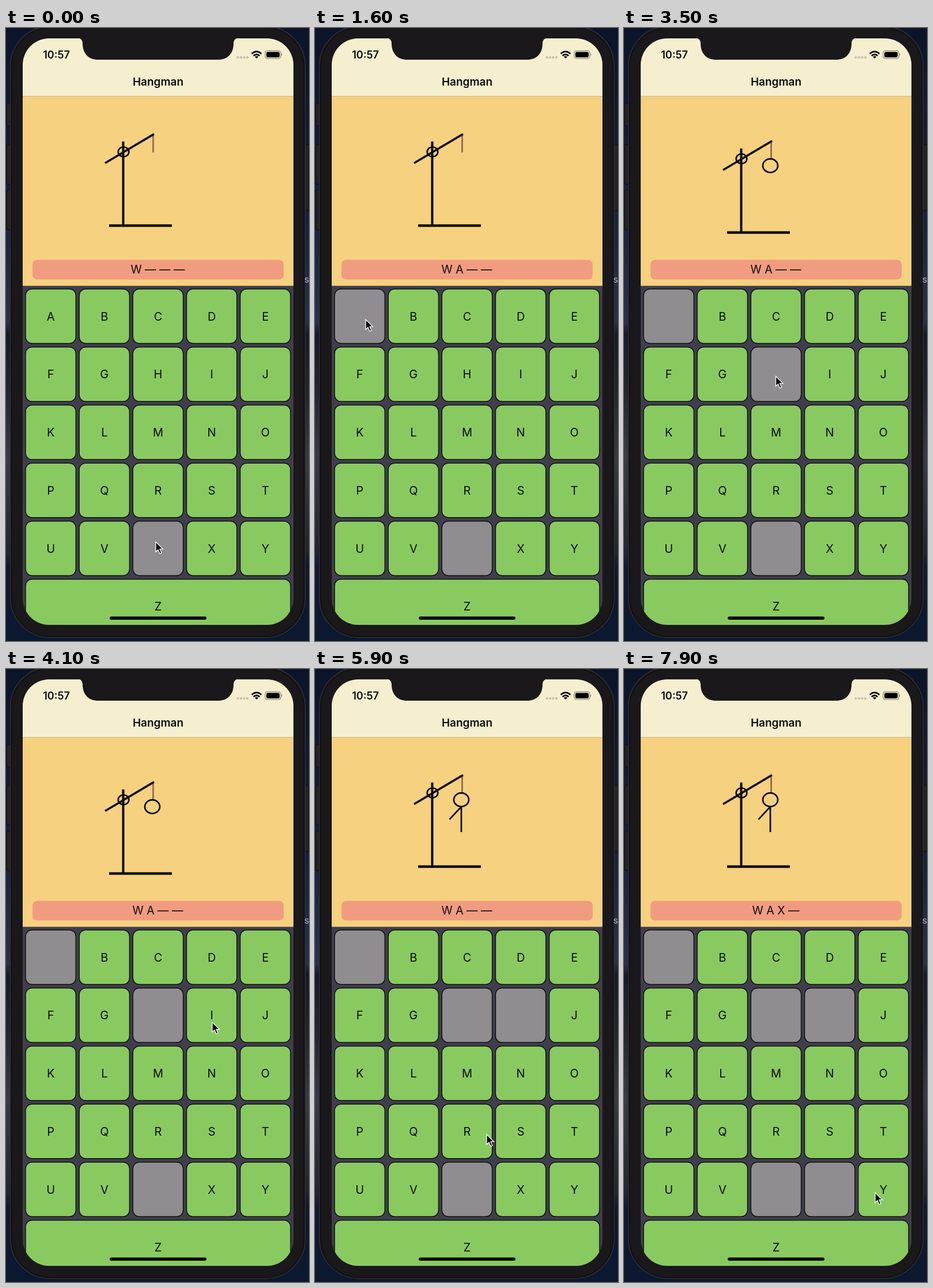
An HTML page for the animation above (8000 ms loop, 526 by 1064 pixels).

```html
<!DOCTYPE html>
<html lang="en">
<head>
<meta charset="utf-8">
<title>Hangman</title>
<style>
  html, body { margin: 0; width: 100%; height: 100%; overflow: hidden; background: #0f1830; }
  svg { display: block; width: 100%; height: 100%; }
  text { font: 20px Inter, "Open Sans", sans-serif; fill: #0b0b0b; text-anchor: middle; }
  .line { fill: none; stroke: #0a0808; stroke-width: 2.7; }
  .key rect { fill: #89ca60; stroke: #0c100c; stroke-width: 1.4; }
  .key.used rect { fill: #908d90; }
  .key.used text { display: none; }
</style>
</head>
<body>
<svg viewBox="0 0 526 1064">
  <defs>
    <linearGradient id="sky" x2="0" y2="1">
      <stop offset="0" stop-color="#0b1429"/>
      <stop offset=".3" stop-color="#14213f"/>
      <stop offset=".48" stop-color="#27324d"/>
      <stop offset=".5" stop-color="#15192a"/>
      <stop offset=".6" stop-color="#252633"/>
      <stop offset=".7" stop-color="#3a3a48"/>
      <stop offset=".85" stop-color="#232533"/>
      <stop offset=".88" stop-color="#0e1932"/>
      <stop offset="1" stop-color="#0c1730"/>
    </linearGradient>
    <clipPath id="screen"><rect x="29" y="18" width="470" height="1018" rx="46"/></clipPath>
  </defs>

  <rect width="526" height="1064" fill="url(#sky)"/>
  <g fill="#242224" stroke="#0c0b0d">
    <rect x="1" y="131" width="9" height="39" rx="2"/>
    <rect x="1" y="202" width="9" height="69" rx="2"/>
    <rect x="1" y="281" width="9" height="69" rx="2"/>
    <rect x="517" y="202" width="9" height="115" rx="2"/>
  </g>
  <rect x="7.5" y="-3" width="512" height="1061" rx="69" fill="#1a181a" stroke="#302e31" stroke-width="1.5"/>
  <rect x="10" y="0" width="507" height="1056" rx="66" fill="none" stroke="#121113" stroke-width="2"/>
  <text x="522" y="442" style="font-size:16px;fill:#aeb0b8">s</text>

  <g clip-path="url(#screen)">
    <rect x="29" y="18" width="470" height="101" fill="#f6efcf"/>
    <rect x="29" y="118" width="470" height="330" fill="#f5d180"/>
    <path d="M29 118.5H499" stroke="#c8b784"/>
    <rect x="29" y="447.5" width="470" height="589" fill="#403e4c"/>
    <g id="keys"></g>
    <path d="M124 17Q133 18 133 27C133 45 144 55 160 55H368C384 55 395 45 395 27Q395 18 404 17Z" fill="#1a181a"/>
  </g>

  <text x="87.5" y="53" style="font-size:18px;font-weight:600">10:57</text>
  <text x="264" y="100" style="font-size:19px;font-weight:600">Hangman</text>
  <g fill="#c9c3aa">
    <circle cx="402.5" cy="51" r="2.2"/><circle cx="408" cy="51" r="2.2"/>
    <circle cx="413.5" cy="51" r="2.2"/><circle cx="419" cy="51" r="2.2"/>
  </g>
  <g fill="none" stroke="#000" stroke-width="2.7">
    <path d="M426.6 44.8Q435 37 443.4 44.8M429.8 48.3Q435 43.4 440.2 48.3"/>
    <path d="M432 50Q435 47.6 438 50L435 53Z" fill="#000" stroke="none"/>
    <rect x="450" y="39.5" width="27" height="13.5" rx="4" stroke="#77735f" stroke-width="1.1"/>
    <rect x="452" y="41.5" width="23" height="9.5" rx="2.3" fill="#000" stroke="none"/>
    <path d="M478.3 44Q480.6 46.2 478.3 48.5Z" fill="#77735f" stroke="none"/>
  </g>

  <g id="gallows" class="line">
    <path d="M255.5 184V216" stroke="#946553"/>
    <path d="M203.5 197V343" stroke-width="4"/>
    <path d="M179 343H288" stroke-width="4.4"/>
    <path d="M172 234.5L257 184" stroke-width="3.6"/>
    <ellipse cx="204" cy="215" rx="9.3" ry="8.5"/>
    <ellipse id="head" cx="254" cy="227" rx="13" ry="11.8" fill="#f5d180"/>
    <path id="torso" d="M254 239V283M254 239L233.5 261"/>
  </g>

  <rect x="46" y="402.5" width="436" height="34" rx="8" fill="#f19c80"/>
  <text id="word" x="263.5" y="425.5" style="font-size:19.5px"></text>
  <rect x="180" y="1021.5" width="168" height="5.5" rx="2.75"/>
  <path id="cursor" d="M0 0V17.2L4 13.5L7 20.5L10 19.2L7 12.4H12.4Z" fill="#000" stroke="#fff" stroke-width="1.3"/>
</svg>

<script>
const $ = id => document.getElementById(id);
const LOOP = 8000, STEP = 100;
const ANSWER = 'WAX_';
const pressedAt = { W: 0, A: 1300, H: 2700, I: 4600, X: 7300 };

// Pointer stops: time, x, y
const stops = [
  [0, 260, 892], [700, 118, 541], [800, 118, 541], [900, 115, 537],
  [1200, 88, 506], [1600, 88, 506], [2500, 257, 603], [2700, 258, 604],
  [3400, 258, 604], [4100, 358, 613], [4900, 358, 613], [5900, 298, 808],
  [6900, 369, 891], [7100, 364, 896], [7400, 364, 896], [7900, 436, 909]
];

$('keys').innerHTML = [...'ABCDEFGHIJKLMNOPQRSTUVWXYZ'].map((letter, i) => {
  const x = 34 + i % 5 * 93.15, y = 453 + Math.floor(i / 5) * 100.75;
  const width = letter === 'Z' ? 460 : 87.3;
  return `<g class="key" id="key${letter}">
    <rect x="${x}" y="${y}" width="${width}" height="94.5" rx="11"/>
    <text x="${x + width / 2}" y="${y + 54.5}">${letter}</text></g>`;
}).join('');

function pointerAt(time) {
  const next = stops.findIndex(stop => stop[0] > time);
  if (next < 0) return stops.at(-1).slice(1);
  const [t0, x0, y0] = stops[next - 1], [t1, x1, y1] = stops[next];
  const p = (time - t0) / (t1 - t0), ease = p * p * (3 - 2 * p);
  return [x0 + (x1 - x0) * ease, y0 + (y1 - y0) * ease];
}

function draw(now) {
  const time = Math.floor(now % LOOP / STEP) * STEP;
  const used = letter => time >= pressedAt[letter];
  for (const letter in pressedAt) $('key' + letter).classList.toggle('used', used(letter));
  $('word').textContent = [...ANSWER].map(c => used(c) ? c : '—').join(' ');

  const head = used('H'), torso = used('I');
  $('head').style.display = head ? '' : 'none';
  $('torso').style.display = torso ? '' : 'none';
  $('gallows').setAttribute('transform', `translate(0 ${head && !torso ? 12 : 0})`);
  $('cursor').setAttribute('transform', `translate(${pointerAt(time)})`);
}

const start = performance.now();
function tick() {
  draw(performance.now() - start);
  requestAnimationFrame(tick);
}
tick();
</script>
</body>
</html>
```
